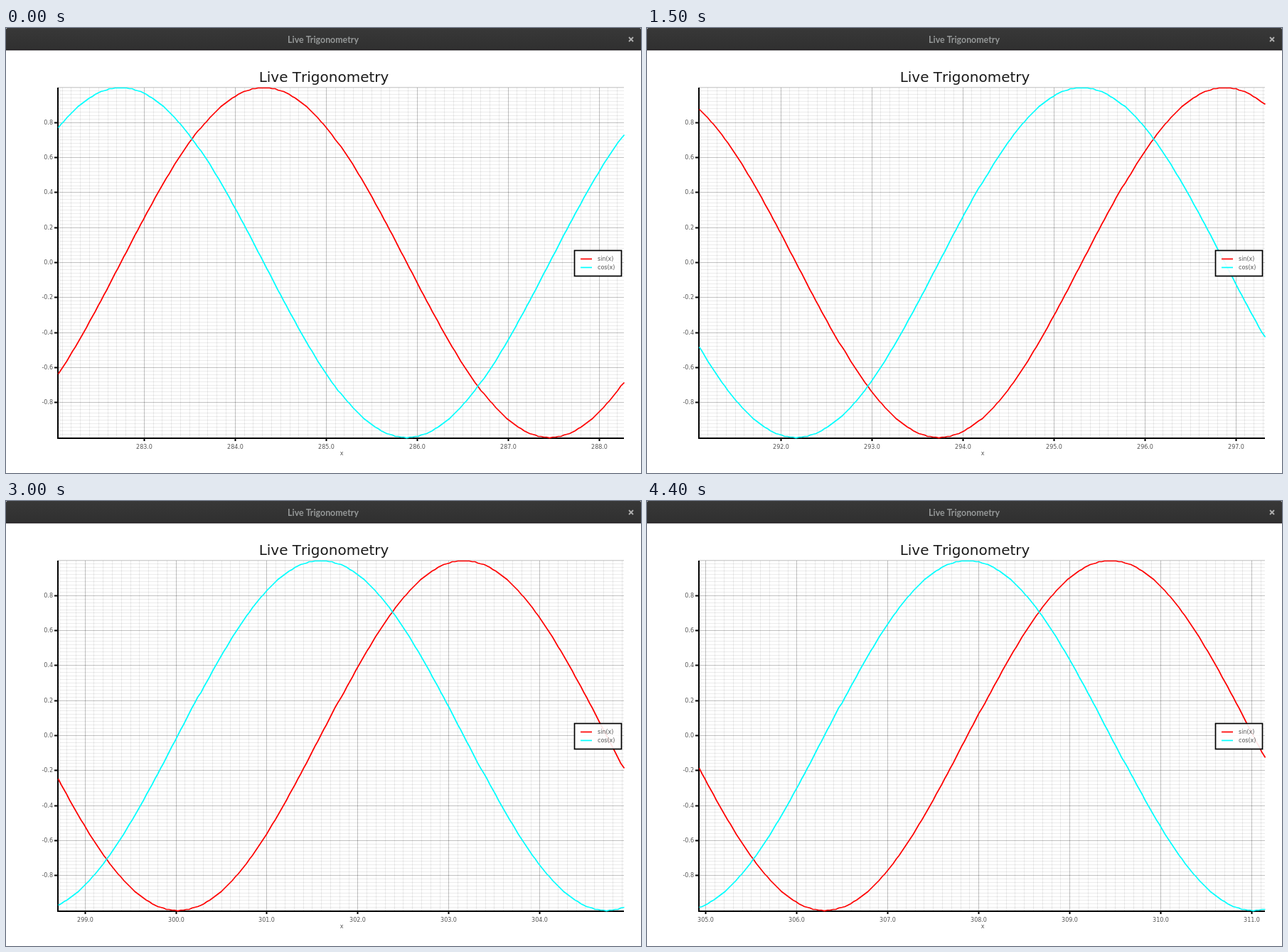
Write an HTML page with a canvas that moves like this. It is 893x627 px and loops after 4.5 s.

```html
<!DOCTYPE html>
<html>
<head>
<meta charset="utf-8">
<style>
  html, body { margin: 0; width: 893px; height: 627px; overflow: hidden; background: #fff; }
  canvas { display: block; }
</style>
</head>
<body>
<canvas id="stage" width="893" height="627"></canvas>
<script>
const ctx = document.getElementById('stage').getContext('2d');
const LEFT = 73, RIGHT = 869, TOP = 84, BOTTOM = 577;
const WIDTH = RIGHT - LEFT, HEIGHT = BOTTOM - TOP;
const DX = Math.PI / 100, SAMPLES = 198; // sample spacing, samples in view
const SPAN = DX * SAMPLES;
const LOOP = 4500, STEP = 100;

// [time in ms, index of the leftmost sample]
const SCROLL = [
  [0, 8978], [600, 9078], [1300, 9230], [1500, 9266], [2000, 9352],
  [3000, 9508], [3300, 9544], [3600, 9580], [3700, 9598],
  [4000, 9644], [4200, 9672], [4400, 9706]
];

// Samples arrive in pairs, so the index is always even.
function firstSample(ms) {
  let t = Math.floor(ms / STEP) * STEP;
  if (t > 2400 && t < 2800) t = 2400; // the plot stalls here
  const i = Math.max(1, SCROLL.findIndex(([time]) => time >= t));
  const [t0, n0] = SCROLL[i - 1], [t1, n1] = SCROLL[i];
  return 2 * Math.round((n0 + (n1 - n0) * (t - t0) / (t1 - t0)) / 2);
}

function rect(x, y, w, h, color) {
  ctx.fillStyle = color;
  ctx.fillRect(x, y, w, h);
}

function text(str, x, y, font, color, align = 'center') {
  ctx.font = font;
  ctx.fillStyle = color;
  ctx.textAlign = align;
  ctx.fillText(str, x, y);
}

const label = (str, x, y, align) => text(str, x, y, '8px "DejaVu Sans", sans-serif', '#555', align);

// Points snap to whole pixels.
const toY = v => BOTTOM + Math.floor(-HEIGHT * (v + 1) / 2 + 1e-3);

function titleBar() {
  const shade = ctx.createLinearGradient(0, 0, 0, 30);
  shade.addColorStop(0, '#383838');
  shade.addColorStop(1, '#303030');
  ctx.fillStyle = shade;
  ctx.beginPath();
  ctx.roundRect(0, 0, 893, 30, [2, 2, 0, 0]);
  ctx.fill();
  rect(0, 30, 893, 1.5, '#1f1c1f');
  text('Live Trigonometry', 446, 21, 'bold 12.4px Lato, sans-serif', '#959898');
  ctx.strokeStyle = '#b0b0b0';
  ctx.lineWidth = 1.8;
  ctx.beginPath();
  ctx.moveTo(876, 13); ctx.lineTo(882, 19);
  ctx.moveTo(882, 13); ctx.lineTo(876, 19);
  ctx.stroke();
}

function grid(toX, start) {
  const light = 'rgba(0,0,0,.08)', bold = 'rgba(0,0,0,.18)';
  const first = Math.ceil(start * 10), last = Math.floor((start + SPAN) * 10);
  for (let i = first; i <= last; i++) {
    const x = toX(i / 10);
    rect(x, TOP, 1, HEIGHT, light);
    if (i % 10 === 0) {
      rect(x, TOP, 1, HEIGHT, bold);
      rect(x - 0.5, BOTTOM, 2, 5, '#000');
      label((i / 10).toFixed(1), x + 0.5, 593);
    }
  }
  for (let i = -49; i <= 50; i++) {
    const y = toY(i / 50);
    rect(LEFT, y, WIDTH, 1, light);
    if (i % 10 === 0 && i < 50) {
      rect(LEFT, y, WIDTH, 1, bold);
      rect(68, y - 0.5, 5, 2, '#000');
      label((i / 50).toFixed(1), 66, y + 3, 'right');
    }
  }
  rect(LEFT, 83, WIDTH, 1, bold);
  rect(72, TOP, 2, HEIGHT + 2, '#000');
  rect(72, BOTTOM, RIGHT - 72, 2, '#000');
}

function curve(fn, color, toX, first) {
  ctx.beginPath();
  for (let n = first; n <= first + SAMPLES; n++) {
    ctx.lineTo(toX(n * DX) + 0.5, toY(fn(n * DX)) + 0.5);
  }
  ctx.strokeStyle = color;
  ctx.lineWidth = 1.7;
  ctx.stroke();
}

function legend() {
  rect(799, 313, 66, 36, 'rgba(255,255,255,.9)');
  ctx.strokeStyle = '#000';
  ctx.lineWidth = 1.7;
  ctx.strokeRect(799.5, 313.5, 66, 36);
  [['sin(x)', '#f00'], ['cos(x)', '#0ff']].forEach(([name, color], i) => {
    const y = 325 + i * 12;
    rect(808, y - 0.4, 16, 1.7, color);
    label(name, 832, y + 3, 'left');
  });
}

function draw(now) {
  const first = firstSample(now % LOOP);
  const start = first * DX;
  const toX = x => LEFT + Math.floor(WIDTH * (x - start) / SPAN + 1e-3);
  rect(0, 0, 893, 627, '#fff');
  titleBar();
  ctx.fontKerning = 'none';
  text('Live Trigonometry', 447, 76, '20px "DejaVu Sans", sans-serif', '#1a1a1a');
  ctx.fontKerning = 'auto';
  grid(toX, start);
  label('x', 472, 602);
  curve(Math.sin, '#f00', toX, first);
  curve(Math.cos, '#0ff', toX, first);
  legend();
}

const begin = performance.now();
function tick() {
  draw(performance.now() - begin);
  requestAnimationFrame(tick);
}
tick();
</script>
</body>
</html>
```
